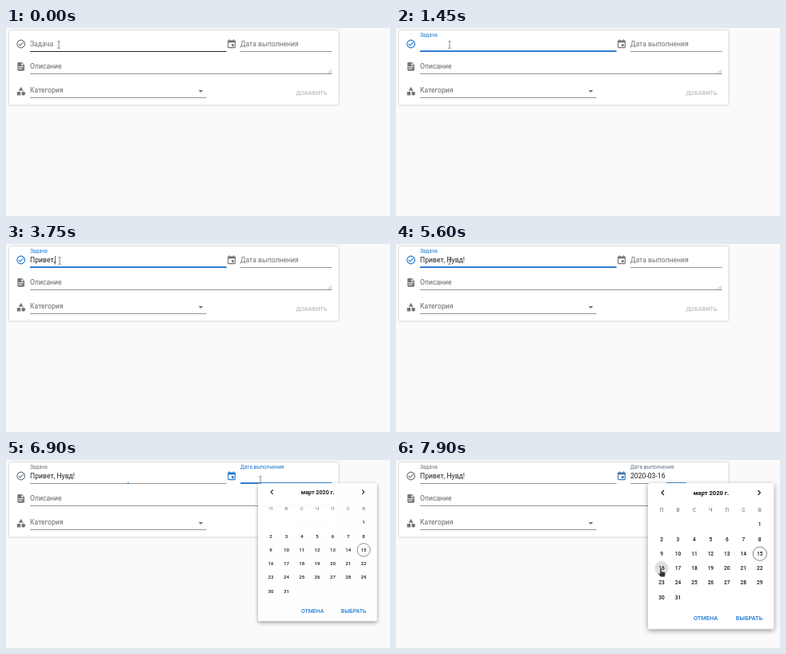
Write an HTML page that moves like this. It is 480x236 px and loops after 8 s.

```html
<!DOCTYPE html>
<html lang="ru">
<head>
<meta charset="utf-8">
<style>
html, body { margin: 0; height: 100%; overflow: hidden; background: #fafafa; }
svg { display: block; width: 100vw; height: 100vh; }
text { font: 8.65px Roboto, sans-serif; fill: #666; white-space: pre; }
.value { fill: #212121; }
.button { font-size: 7.4px; font-weight: 500; fill: #1976d2; }
.disabled { fill: #bdbdbd; }
.month { font-size: 7.58px; font-weight: 700; fill: #111; text-anchor: middle; }
.day { font-size: 6.5px; font-weight: 500; fill: #111; text-anchor: middle; }
.weekday { fill: #888; }
.line { fill: #949494; }
.icon { fill: #757575; fill-rule: evenodd; }
.blue { fill: #1976d2; }
#card { fill: #fff; filter: drop-shadow(0 .8px 1px rgba(0,0,0,.32)); }
#sheet { fill: #fff; filter: drop-shadow(0 2px 3px rgba(0,0,0,.4)); }
#cursor path { stroke-width: .8; }
</style>
</head>
<body>
<svg viewBox="0 0 480 236">
  <rect id="card" x="4" y="3" width="411.5" height="93.5" rx="1.5"/>

  <path class="icon" id="taskIcon" transform="translate(12.2 13.5) scale(.541)" d="M12 2a10 10 0 1 0 0 20 10 10 0 0 0 0-20m0 18a8 8 0 1 1 0-16 8 8 0 0 1 0 16m4.59-12.42L10 14.17l-2.59-2.58L6 13l4 4 8-8z"/>
  <path class="icon" id="dateIcon" transform="translate(275.5 13.8) scale(.541)" d="M19 19H5V8h14m-3-7v2H8V1H6v2H5c-1.11 0-2 .89-2 2v14a2 2 0 0 0 2 2h14a2 2 0 0 0 2-2V5a2 2 0 0 0-2-2h-1V1m-1 11h-5v5h5z"/>
  <path class="icon" transform="translate(12.2 41.8) scale(.541)" d="M13 9h5.5L13 3.5V9M6 2h8l6 6v12a2 2 0 0 1-2 2H6a2 2 0 0 1-2-2V4c0-1.11.89-2 2-2m9 16v-2H6v2h9m3-4v-2H6v2h12z"/>
  <path class="icon" transform="translate(12.2 72.8) scale(.541)" d="M11 13.5v8H3v-8h8M12 2l5.5 9h-11zM17.5 13a4.5 4.5 0 1 1 0 9 4.5 4.5 0 0 1 0-9z"/>

  <rect class="line" id="taskLine" x="30" y="29" width="245.5" height="1"/>
  <rect class="blue" id="taskFocus" y="28.2" height="1.7"/>
  <rect class="line" id="dateLine" x="293" y="29" width="114.5" height="1"/>
  <rect class="blue" id="dateFocus" y="28.2" height="1.7"/>
  <rect class="line" id="noteLine" x="30" y="57" width="377.5" height="1"/>
  <rect class="line" id="kindLine" x="30" y="87" width="220.5" height="1"/>

  <text id="taskLabel">Задача</text>
  <text id="dateLabel">Дата выполнения</text>
  <text x="30" y="51">Описание</text>
  <text x="30" y="81.3">Категория</text>
  <text class="value" id="task" x="30" y="23"></text>
  <text class="value" id="date" x="293" y="23">2020-03-16</text>
  <rect id="caret" y="15" width=".7" height="10.5" fill="#222"/>
  <path d="M402 57.3l5-5M404.8 57.3l2.2-2.2" stroke="#888" stroke-width=".7"/>
  <path class="icon" d="M240.6 78h5.8l-2.9 2.9z"/>
  <text class="button disabled" x="362.6" y="83.7">ДОБАВИТЬ</text>

  <g id="picker">
    <rect id="sheet" x="315" y="29" width="157.3" height="183.3" rx="2"/>
    <path d="M334.8 38l-2.8 3 2.8 3M452.6 38l2.8 3-2.8 3" fill="none" stroke="#222" stroke-width="1.2"/>
    <text class="month" x="394" y="43.6">март 2020 г.</text>
    <circle id="hover" r="8.7" fill="#e0e0e0"/>
    <circle cx="454.8" cy="117.7" r="8.6" fill="none" stroke="#333" stroke-width=".6"/>
    <g id="days"></g>
    <text class="button" x="372" y="201">ОТМЕНА</text>
    <text class="button" x="424.8" y="201">ВЫБРАТЬ</text>
  </g>

  <g id="cursor">
    <path id="beam" d="M-1.8-4.3h1.2l.6.5.6-.5h1.2M0-3.8v7.6M-1.8 4.3h1.2l.6-.5.6.5h1.2" fill="none" stroke="#666"/>
    <path id="arrow" d="M0 0v9.5l2.2-2 1.5 3.4 1.4-.6-1.5-3.3h3z" fill="#222" stroke="#fff"/>
    <path id="hand" d="M-1 0q1-1 2 0v4l4 .8q1 .3 .8 1.4l-.8 4.6h-5l-3.6-4q.4-1.2 1.6-.5l1 .6z" fill="#333" stroke="#fff" style="stroke-width:.4"/>
  </g>
</svg>
<script>
const LOOP = 8000, FOCUS_TASK = 880, FOCUS_DATE = 6640, OPEN = 6710, PICK = 7785;
const message = 'Привет, Нувд!';
const keyTimes = [2250, 2450, 2600, 2750, 3050, 3100, 3750, 3950, 4250, 4500, 4600, 4700, 5000];
const GREY = [112, 112, 112], BLUE = [25, 118, 210];

const $ = id => document.getElementById(id);
const set = (id, attrs) => { for (const k in attrs) $(id).setAttribute(k, attrs[k]); };
const show = (id, on) => { $(id).style.display = on ? '' : 'none'; };
const mix = (a, b, p) => a + (b - a) * p;
const ramp = (t, start, length) => Math.min(1, Math.max(0, (t - start) / length));
const tint = p => `rgb(${GREY.map((g, i) => mix(g, BLUE[i], p))})`;
const smooth = p => p * p * (3 - 2 * p);

// cubic-bezier(.25, .8, .5, 1)
function ease(p) {
  const curve = (s, a, b) => 3 * (1 - s) ** 2 * s * a + 3 * (1 - s) * s * s * b + s ** 3;
  let lo = 0, hi = 1;
  for (let i = 0; i < 20; i++) {
    const mid = (lo + hi) / 2;
    if (curve(mid, .25, .5) < p) lo = mid; else hi = mid;
  }
  return curve(lo, .8, 1);
}

const cellX = col => 332 + col * 20.45;
const cellY = row => 81 + row * 18.25;
const addDay = (x, y, label, kind = '') =>
  `<text class="day ${kind}" x="${x}" y="${y + 2.3}">${label}</text>`;
let cells = [...'ПВСЧПСВ'].map((d, i) => addDay(cellX(i), 62.5, d, 'weekday')).join('');
for (let d = 1; d <= 31; d++) cells += addDay(cellX((d + 5) % 7), cellY(Math.floor((d + 5) / 7)), d);
$('days').innerHTML = cells;

function mouseAt(t) {
  if (t < 5780) return [66 + ramp(t, 880, 50), 21];
  if (t < 7130) {
    const p = smooth(ramp(t, 5780, 650)), q = 1 - p;
    return [q * q * 67 + 2 * p * q * 170 + p * p * 318, q * q * 21 + 2 * p * q * 112 + p * p * 25];
  }
  const p = smooth(ramp(t, 7130, 500));
  return [mix(318, 331, p), mix(25, 136, p)];
}

function drawField(name, x, width, focusAt, blurAt, t) {
  const rise = ease(ramp(t, focusAt, 300));
  const active = t < blurAt ? rise : 1 - ease(ramp(t, blurAt, 300));
  const iconTint = t < blurAt ? rise : 1 - ramp(t, blurAt, 300);
  set(name + 'Label', { transform: `translate(${x} ${mix(23, 11.2, rise)}) scale(${mix(1, .75, rise)})` });
  $(name + 'Label').style.fill = tint(active);
  $(name + 'Icon').style.fill = tint(iconTint);
  set(name + 'Focus', { x: x + width * (1 - active) / 2, width: width * active });
}

function draw(t) {
  drawField('task', 30, 245.5, FOCUS_TASK, FOCUS_DATE, t);
  drawField('date', 293, 114.5, FOCUS_DATE, PICK, t);

  $('task').textContent = message.slice(0, keyTimes.filter(k => k <= t).length);
  show('caret', t >= FOCUS_TASK && t < 1450 || t >= 2050 && t < 5600);
  set('caret', { x: 30 + $('task').getComputedTextLength() });
  show('date', t >= PICK);

  const open = ease(ramp(t, OPEN, 300));
  show('picker', open > 0);
  set('picker', { transform: `translate(315 29) scale(${open}) translate(-315 -29)`, opacity: open });

  const [x, y] = mouseAt(t);
  const inPicker = open > 0 && y > 29;
  const over = {
    task: y < 31 && x < 276,
    date: y < 31 && x > 293,
    note: !inPicker && y > 40 && y < 58,
    kind: !inPicker && y > 66 && x < 250
  };
  for (const name in over) $(name + 'Line').style.fill = over[name] ? '#222' : '';

  const row = Math.round((y - 81) / 18.25);
  const onDay = inPicker && row > 0 && Math.hypot(x - cellX(0), y - cellY(row)) < 9;
  show('hover', onDay);
  set('hover', { cx: cellX(0), cy: cellY(row) });

  const typing = over.task || over.date || over.note;
  show('beam', typing);
  show('hand', onDay);
  show('arrow', !typing && !onDay);
  set('cursor', { transform: `translate(${x} ${y})` });
}

function tick() {
  draw(performance.now() % LOOP);
  requestAnimationFrame(tick);
}
tick();
</script>
</body>
</html>
```
